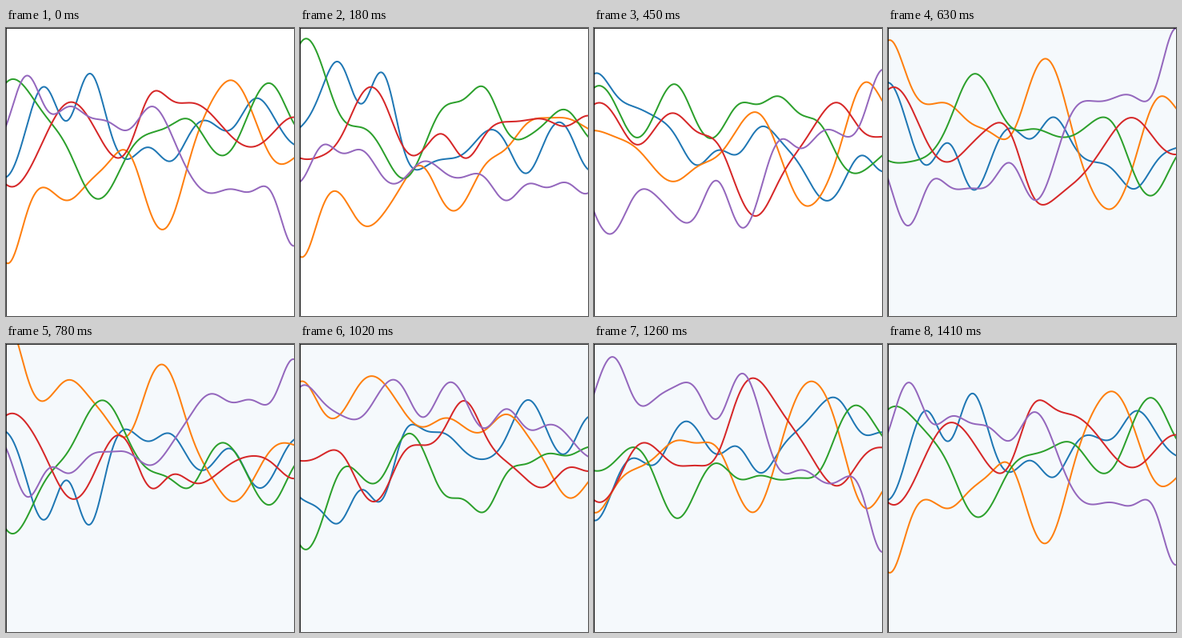
Recreate the animation shown at these times as a matplotlib script. Size 360 px wide and 360 px high, loop 1.44 s.

```python
import numpy as np
import matplotlib.pyplot as plt
from matplotlib.animation import FuncAnimation

SIZE, FRAMES, INTERVAL = 360, 48, 30
MEAN = 138.5
SCALE = 19      # length scale of the random curves, in pixels
NOISE = 1e-3
KNOTS = np.linspace(0, SIZE, 15)
WHITE, PALE = "white", "#f5f9fc"
PALE_FROM = 20

xs = np.linspace(0, SIZE, 361)

fig = plt.figure(figsize=(5, 5), dpi=72)
ax = fig.add_axes([0, 0, 1, 1])
ax.set(xlim=(0, SIZE), ylim=(SIZE, 0), xticks=[], yticks=[])


def kernel(p, q):
    return np.exp(-((p[:, None] - q) / SCALE) ** 2 / 2)


# Gaussian-process mean: maps a few key heights to a smooth curve.
gram = kernel(KNOTS, KNOTS) + NOISE * np.eye(len(KNOTS))
smooth = kernel(xs, KNOTS) @ np.linalg.inv(gram)


def curve(color, start, quarter):
    """A curve with its key offsets at the start and a quarter turn later."""
    line, = ax.plot(xs, 0 * xs, color=color, lw=2)
    return line, smooth @ start, smooth @ quarter


curves = [
    curve("tab:blue",
          [48, -15, -63, -23, -81, -16, 25, 11, 28, -9, -20, -13, -49, -28, 7],
          [-68, -68, -69, -39, -36, 29, 26, 25, -3, -3, 27, 74, 45, 11, 47]),
    curve("tab:orange",
          [155, 94, 62, 77, 55, 29, 19, 91, 103, 19, -47, -73, -31, 26, 24],
          [53, 36, 37, 74, 80, 50, 31, 23, 8, 27, 65, 47, -6, -62, -42]),
    curve("tab:green",
          [-70, -62, -26, 12, 66, 65, 16, -7, -17, -23, 12, 12, -44, -67, -19],
          [-98, -74, -13, -32, -46, 5, 1, -49, -54, -67, -29, -15, 13, 17, 15]),
    curve("tab:red",
          [57, 44, -8, -45, -27, 16, 9, -55, -49, -45, -30, -2, 10, -8, -27],
          [-23, -13, 4, -34, -45, -3, 10, 48, 83, 38, 0, -31, -43, -15, -14]),
    curve("tab:purple",
          [-16, -79, -36, -40, -28, -21, -12, -40, -8, 47, 68, 63, 65, 72, 134],
          [92, 93, 61, 60, 94, 93, 52, 99, 75, 22, 41, 18, 21, 6, -38]),
]


def draw(i):
    angle = 2 * np.pi * i / FRAMES
    ax.set_facecolor(PALE if i >= PALE_FROM else WHITE)
    for line, start, quarter in curves:
        line.set_ydata(MEAN + start * np.cos(angle) + quarter * np.sin(angle))
    return [line for line, _, _ in curves]


anim = FuncAnimation(fig, draw, frames=FRAMES, interval=INTERVAL,
                     repeat=True, repeat_delay=0, blit=False)
plt.show()
```
